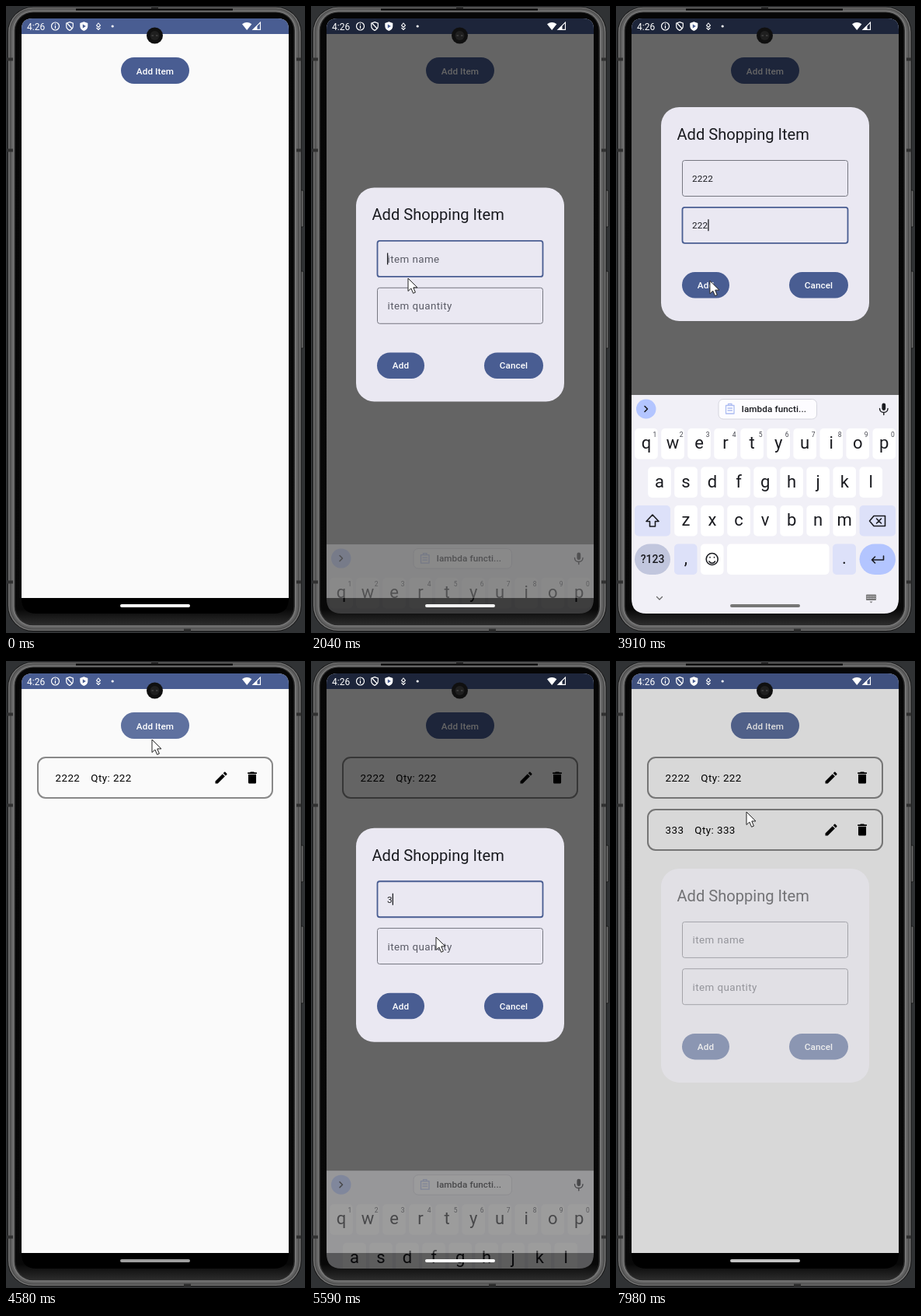
Recreate the animation shown at these times as an HTML page. Size 385 by 806 pixels, loop 8000 ms.

```html
<!DOCTYPE html>
<html lang="en">
<head>
<meta charset="utf-8">
<title>Shopping list</title>
<style>
  html, body { margin: 0; width: 100%; height: 100%; overflow: hidden; background: #303234; }
  svg { display: block; }
  text { font-family: Roboto, sans-serif; fill: #1a1b20; white-space: pre; }
  .label { font-size: 11.72px; font-weight: 500; letter-spacing: .08px; fill: #fff; text-anchor: middle; }
  .title { font-size: 20.1px; }
  .hint { font-size: 13.4px; letter-spacing: .42px; fill: #5a5b66; }
  .typed { font-size: 11.72px; letter-spacing: .2px; }
  .row text { font-size: 13.4px; letter-spacing: .42px; fill: #000; }
  .key { font-size: 22px; text-anchor: middle; }
  .num { font-size: 8.5px; text-anchor: middle; fill: #45464f; }
  .primary { fill: #495d92; }
  .line { fill: none; stroke: #1a1b20; stroke-width: 1.6; stroke-linejoin: round; stroke-linecap: round; }
</style>
</head>
<body>
<svg width="385" height="806" viewBox="0 0 385 806">
  <defs>
    <clipPath id="screen"><path d="M20 30Q20 16 34 16H350Q364 16 364 30V762Q364 781 345 781H39Q20 781 20 762Z"/></clipPath>
    <linearGradient id="chin" x1="0" x2="0" y1="0" y2="1">
      <stop offset="0" stop-color="#060606"/><stop offset=".975" stop-color="#080808"/><stop offset="1" stop-color="#2b2b2b"/>
    </linearGradient>
    <path id="pencil" d="M3 17.25V21h3.75L17.81 9.94l-3.75-3.75L3 17.25zM20.71 7.04c.39-.39.39-1.02 0-1.41l-2.34-2.34c-.39-.39-1.02-.39-1.41 0l-1.83 1.83 3.75 3.75 1.83-1.83z"/>
    <path id="bin" d="M6 19c0 1.1.9 2 2 2h8c1.1 0 2-.9 2-2V7H6v12zM19 4h-3.5l-1-1h-5l-1 1H5v2h14V4z"/>
  </defs>

  <!-- phone body -->
  <g>
    <rect x="378" y="237" width="5" height="47" rx="1.5" fill="#6a6a6a" stroke="#161616"/>
    <rect x="378" y="341" width="5" height="99" rx="1.5" fill="#6a6a6a" stroke="#161616"/>
    <g id="rim"></g>
    <path d="M2 68.5h7M2 185.5h7M2 740.5h7M374 68.5h6M374 185.5h6M374 740.5h6" stroke="#303030" stroke-width="4"/>
    <path d="M187 2.5h9M229 802h9" stroke="#303030" stroke-width="3"/>
    <path d="M90 4.5H292" stroke="#0c0c0c" stroke-width="2.5"/>
  </g>

  <g clip-path="url(#screen)">
    <rect x="20" y="16" width="344" height="765" fill="#000"/>
    <rect x="20" y="16" width="344" height="745" fill="#fafafa"/>
    <rect x="20" y="16" width="344" height="20" class="primary"/>
    <rect x="148" y="66" width="88" height="34" rx="17" class="primary"/>
    <rect id="press" x="148" y="66" width="88" height="34" rx="17" fill="#fff"/>
    <text class="label" x="192" y="87.7">Add Item</text>
    <g id="rows"></g>
    <rect id="scrim" x="20" y="16" width="344" height="745"/>

    <g id="dialog">
      <rect x="58" width="268" height="275" rx="23.4" fill="#eae8f2"/>
      <text class="title" x="78.5" y="42">Add Shopping Item</text>
      <g id="fields"></g>
      <rect x="85" y="212" width="61" height="33.5" rx="16.7" class="primary"/>
      <text class="label" x="115.5" y="233">Add</text>
      <rect x="223" y="212" width="76" height="33.5" rx="16.7" class="primary"/>
      <text class="label" x="261" y="233">Cancel</text>
    </g>

    <g id="keyboard"></g>
    <rect id="handle" x="147" y="769" width="90" height="4" rx="2"/>

    <!-- status bar -->
    <text x="27" y="30.6" font-size="12" style="fill:#fff">4:26</text>
    <g fill="none" stroke="#fff" stroke-width="1.2">
      <circle cx="63.5" cy="26" r="5"/><path d="M63.5 25v4M63.5 22.8v1.2"/>
      <path d="M82 20.6l4.3 1.6v3.4c0 2.7-1.7 4.7-4.3 5.8-2.6-1.1-4.3-3.1-4.3-5.8V22.2zM79 22.500l6 6.500"/>
      <path d="M116.5 25l2.5-3 2.5 3-2.5 2.5zM116.5 28l2.5 2.5 2.5-2.5" stroke-width="1.1"/>
    </g>
    <path fill="#fff" d="M100.3 20.2l5 1.8v4c0 2.8-2 5-5 6-3-1-5-3.2-5-6V22z"/>
    <path class="primary" d="M98.8 23.5l4 2.5-4 2.5z"/>
    <circle cx="137.2" cy="26" r="1.6" fill="#fff"/>
    <path fill="#fff" d="M304 23.3q6.2-4.8 12.4 0L310.2 31z"/>
    <path fill="none" stroke="#fff" stroke-width="1.1" d="M318 30.4h9.5V21z"/>
    <path fill="#fff" d="M317.5 31l6-6v6z"/>
  </g>

  <circle cx="191.5" cy="38" r="10.5" fill="#101010"/>
  <circle cx="191.5" cy="38" r="6" fill="#1f1f1f"/>
  <path d="M187.5 38h2.5M193 38h2.5" stroke="#3a3a3a" stroke-width="2"/>

  <path id="pointer" d="M0 0V16.5L3.9 13 6.6 19.3 9.4 18.1 6.8 11.9H12z" fill="#fff" stroke="#222" stroke-width="1" stroke-linejoin="round"/>
</svg>

<script>
const LOOP = 8000;
const $ = id => document.getElementById(id);
const clamp = v => Math.max(0, Math.min(1, v));
const ramp = (t, start, length) => clamp((t - start) / length);
const smooth = u => u * u * (3 - 2 * u);

// One entry per visit to the dialog; *Keys are the times of the key strokes.
const sessions = [
  { open: 1244, name: '2222', nameFocus: 1800, rise: 1980, nameKeys: [2350, 2450, 2550, 2650],
    qty: '222', qtyFocus: 3080, qtyKeys: [3250, 3370, 3500], close: 4010 },
  { open: 4660, name: '333', nameFocus: 5380, rise: 5500, nameKeys: [5560, 5860, 6010],
    qty: '333', qtyFocus: 6430, qtyKeys: [6530, 6610, 6700], close: 7030 },
  { open: 7930, name: '', nameFocus: 9e3, rise: 9e3, nameKeys: [], qty: '', qtyFocus: 9e3, qtyKeys: [], close: 9e3 }
];
const presses = [1020, 4490, 7760];
const pointerPath = [
  [340, 231, 196], [800, 190, 93], [1310, 190, 93], [1700, 125, 350], [2200, 125, 350],
  [2600, 122, 220], [2840, 122, 220], [3050, 128, 286], [3840, 128, 286], [3930, 120, 362],
  [4080, 120, 362], [4430, 190, 88], [4530, 190, 88], [4580, 188, 101], [5050, 161, 355],
  [5700, 161, 355], [6380, 130, 288], [6700, 130, 288], [6860, 124, 373], [7030, 124, 373],
  [7450, 190, 88], [7800, 190, 90], [7980, 168, 194]
];
const handleGrey = [
  [0, 255], [2000, 255], [2300, 174], [2720, 174], [2900, 118], [4250, 118], [4580, 158],
  [5000, 255], [5620, 255], [5900, 174], [6250, 118], [7330, 118], [7980, 196]
];

function track(points, t, ease = u => u) {
  const next = points.findIndex(p => p[0] > t);
  if (next === 0) return points[0].slice(1);
  if (next < 0) return points.at(-1).slice(1);
  const a = points[next - 1], b = points[next];
  const u = ease((t - a[0]) / (b[0] - a[0]));
  return a.slice(1).map((v, i) => v + (b[i + 1] - v) * u);
}

// Nested rounded plates, from the outer edge of the metal rim to the glass.
function buildRim() {
  const plates = [[2, '#151515'], [3, '#777'], [4.5, '#4c4c4c'], [6, '#5e5e5e'], [8, '#6c6c6c'], [9.5, '#808080'], [10.5, '#2c2c2c'], [12, 'url(#chin)']];
  $('rim').innerHTML = plates.map(([inset, fill]) => {
    const top = 1 + (inset - 2) * .75, bottom = 804 - (inset - 2) * .9;
    return `<rect x="${inset}" y="${top}" width="${382.5 - 2 * inset}" height="${bottom - top}" rx="${35 - inset}" fill="${fill}"/>`;
  }).join('');
}

function buildRows() {
  $('rows').innerHTML = sessions.slice(0, 2).map((s, i) => `
    <g class="row" transform="translate(0 ${i * 67})">
      <rect x="41" y="124" width="302" height="52" rx="10" fill="none" stroke="#888" stroke-width="2"/>
      <text x="63.5" y="155.2">${s.name}</text>
      <text x="${63.5 + s.name.length * 7.95 + 14}" y="155.2">Qty: ${s.qty}</text>
      <use href="#pencil" transform="translate(267 140) scale(.837)"/>
      <use href="#bin" transform="translate(307 140) scale(.837)"/>
    </g>`).join('');
}

function buildFields() {
  $('fields').innerHTML = ['item name', 'item quantity'].map((hint, i) => `
    <g transform="translate(0 ${68 + i * 60.3})">
      <rect x="85.5" y=".5" width="213" height="46" rx="3" fill="none"/>
      <text class="hint" x="98.5" y="28.5">${hint}</text>
      <text class="typed" x="98" y="28"></text>
      <path d="M0 16V31" stroke="#1a1b20" stroke-width="1.3"/>
    </g>`).join('');
}

function buildKeyboard() {
  const box = (x, y, w, h, fill, r = 5) => `<rect x="${x}" y="${y}" width="${w}" height="${h}" rx="${r}" fill="${fill}"/>`;
  const write = (cls, x, y, s, extra = '') => `<text class="${cls}" x="${x}" y="${y}" ${extra}>${s}</text>`;
  const line = (d, extra = '') => `<path class="line" d="${d}" ${extra}/>`;
  const pale = '#dde1f9', blue = '#b3c5ff';
  let out = box(20, 500, 344, 300, '#f1f0f7', 0);

  out += box(26, 505.5, 25.5, 25, blue, 12.5) + line('M37 514.5l3.5 3.5-3.5 3.5');
  out += `<rect x="132" y="505.5" width="126.5" height="25.5" rx="6" fill="#fdfcff" stroke="#d5d5de"/>`;
  out += line('M141.5 513.5h10.5v10.5h-10.5zM144.5 513.5v-2h4.5v2M144 517h5.5M144 520h5.5', 'style="stroke:#aebdf2;stroke-width:1.3"');
  out += write('label', 203.5, 522.2, 'lambda functi...', 'style="fill:#1a1b20"');
  out += box(342.4, 510.5, 4.8, 9.5, '#1a1b20', 2.4) + line('M339.5 517.5c0 6.5 10.5 6.5 10.5 0M344.8 522.5v3', 'style="stroke-width:1.4"');

  ['qwertyuiop', 'asdfghjkl', 'zxcvbnm'].forEach((letters, row) => {
    [...letters].forEach((c, i) => {
      const x = [39, 56, 90][row] + i * 34.03, y = 543 + row * 49.5;
      out += box(x - 14.8, y, 29.6, 39.5, '#fff') + write('key', x, y + 26.3, c);
      if (!row) out += write('num', x + 11, y + 11, (i + 1) % 10);
    });
  });

  out += box(24, 642, 46, 39.5, pale) + line('M47 654l-8 8.5h4.5v6.5h7v-6.5h4.5z');
  out += box(313.5, 642, 46.5, 39.5, pale) + line('M332 655.5h14.5v13H332l-5.5-6.5zM335.5 659l6 6M341.5 659l-6 6');
  out += box(24, 691.5, 46, 39.5, '#c1c6dd', 19.7) + write('key', 47, 716.2, '?123', 'style="font-size:14px;font-weight:500"');
  out += box(75, 691.5, 29.5, 39.5, pale) + write('key', 90, 716.5, ',');
  out += box(109, 691.5, 29.5, 39.5, '#fff') + `<circle class="line" cx="123.7" cy="711" r="7.5"/>`;
  out += line('M120 714c2 3 5.5 3 7.5 0M121 708.5v.5M126.5 708.5v.5');
  out += box(143, 691.5, 131.5, 39.5, '#fff');
  out += box(279, 691.5, 30, 39.5, pale) + write('key', 294, 716.5, '.');
  out += box(313.5, 691.5, 46.5, 39.5, blue, 19.7) + line('M344.5 707v5h-15M333.5 708l-4 4 4 4');

  out += line('M52.5 759.5l3.5 3.5 3.5-3.5', 'style="stroke:#666;stroke-width:1.2"');
  out += box(322, 756.5, 13, 7.5, '#777', 1) + `<path d="M323 759h11M323 761.5h11" stroke="#f1f0f7" stroke-dasharray="1 1"/>`;
  out += `<path d="M326.5 765.5h4l-2 2z" fill="#777"/>`;
  $('keyboard').innerHTML = out;
}

const riseCurve = u => 1 - Math.pow(1 - u, 2.3);

function drawField(field, text, focus, blur, keys, t) {
  const [frame, hint, typed, caret] = field.children;
  const focused = t >= focus && t < blur;
  const count = keys.filter(k => t >= k).length;
  const lastEvent = Math.max(focus, ...keys.filter(k => t >= k));
  frame.setAttribute('stroke', focused ? '#495d92' : '#757680');
  frame.setAttribute('stroke-width', focused ? 1.8 : 1);
  hint.style.display = count ? 'none' : '';
  typed.textContent = text.slice(0, count);
  caret.setAttribute('transform', `translate(${98.6 + count * 6.78} 0)`);
  caret.style.display = focused && (t - lastEvent) % 1000 < 500 ? '' : 'none';
}

function draw(t) {
  const s = sessions.findLast(x => t >= x.open) || sessions[0];
  const opening = ramp(t, s.open, 220), closing = ramp(t, s.close, 220);
  const rise = ramp(t, s.rise, 400), fall = ramp(t, s.close + 20, 280);

  $('scrim').setAttribute('opacity', .6 * opening * (1 - closing));
  const lift = riseCurve(ramp(t - 22, s.rise, 400));
  $('dialog').setAttribute('transform', `translate(0 ${261 - 131 * lift + 13 * (1 - opening) ** 3 + 8 * closing})`);
  $('dialog').setAttribute('opacity', clamp(2.3 * opening) * clamp(1 - 2 * closing));

  const [nameField, qtyField] = $('fields').children;
  drawField(nameField, s.name, s.nameFocus, s.qtyFocus, s.nameKeys, t);
  drawField(qtyField, s.qty, s.qtyFocus, s.close, s.qtyKeys, t);

  $('keyboard').setAttribute('transform', `translate(0 ${281 * (1 - riseCurve(rise) + fall * fall)})`);
  $('keyboard').setAttribute('opacity', clamp(rise * 1.6) * clamp(2 - 2 * fall));

  [...$('rows').children].forEach((row, i) => row.style.display = t >= sessions[i].close ? '' : 'none');
  const press = Math.max(...presses.map(p => ramp(t, p, 60) * (1 - ramp(t, p + 200, 270))));
  $('press').setAttribute('opacity', .12 * press);

  const grey = Math.round(track(handleGrey, t)[0]);
  $('handle').setAttribute('fill', `rgb(${grey},${grey},${grey})`);

  const [x, y] = track(pointerPath, t, smooth);
  $('pointer').setAttribute('transform', `translate(${x} ${y})`);
  $('pointer').style.display = t >= 340 ? '' : 'none';
}

buildRim();
buildRows();
buildFields();
buildKeyboard();
const start = performance.now();
function tick() {
  draw((performance.now() - start) % LOOP);
  requestAnimationFrame(tick);
}
tick();
</script>
</body>
</html>
```
